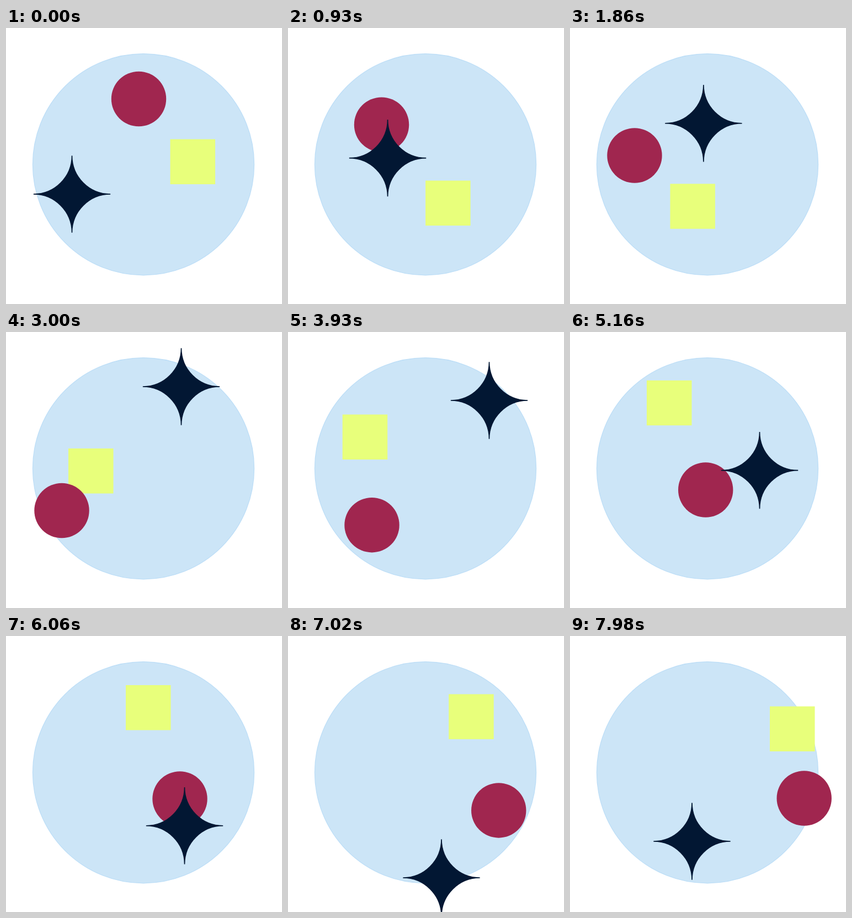
An HTML page that plays this animation: 500 px wide and 500 px high, repeating every 8 s.

```html
<!DOCTYPE html>
<html lang="en">
<head>
<meta charset="utf-8">
<title>Drifting shapes</title>
<style>
  html, body { margin: 0; width: 100%; height: 100%; overflow: hidden; background: #fff; }
  svg { display: block; width: 100vw; height: 100vh; }
</style>
</head>
<body>
<svg viewBox="0 0 500 500">
  <circle cx="249" cy="247.2" r="200.5" fill="#cce5f7" stroke="#bfdff7" stroke-width="1.4"/>
  <rect id="square" width="81.5" height="81.5" fill="#e8ff7b"/>
  <circle id="disc" r="49.7" fill="#a0264f"/>
  <path id="star" fill="#021733" stroke="#021733" stroke-width="1.6"
    d="M0-69.7A69.7 69.7 0 0 0 69.7 0A69.7 69.7 0 0 0 0 69.7A69.7 69.7 0 0 0-69.7 0A69.7 69.7 0 0 0 0-69.7Z"/>
</svg>
<script>
  const LOOP = 8000, STEP = 30;

  // Turning points of each drift: [ms, x, y]
  const drifts = {
    square: [[0, 297.5, 201.5], [810, 257, 270], [1620, 197.5, 291], [3000, 113, 211],
      [3930, 98.7, 149.5], [5160, 139, 87.7], [6060, 217, 89], [7980, 362, 127.5]],
    disc: [[0, 240.5, 128.5], [1860, 117, 231], [3000, 101, 323.5], [3540, 121, 362],
      [3930, 152, 349.7], [5160, 245.7, 286], [6060, 315, 295], [7290, 398, 318], [7980, 424.2, 294]],
    star: [[0, 119.5, 301], [3000, 317.5, 99], [3480, 351, 81.5], [3930, 364.5, 124],
      [6060, 323.5, 343.7], [6480, 308.5, 386.3], [7020, 278, 438], [7980, 221, 372]]
  };

  const slope = (a, b, axis) => (b[axis] - a[axis]) / (b[0] - a[0]);

  // Catmull-Rom velocity; the two ends continue the neighbouring curve.
  function velocity(points, i, axis) {
    const last = points.length - 1;
    if (i > 0 && i < last) return slope(points[i - 1], points[i + 1], axis);
    const next = i ? last - 1 : 1;
    return 2 * slope(points[i], points[next], axis) - velocity(points, next, axis);
  }

  function position(points, t) {
    const i = points.findLastIndex((p, k) => p[0] <= t && k < points.length - 1);
    const a = points[i], b = points[i + 1];
    const span = b[0] - a[0], u = (t - a[0]) / span, v = 1 - u;
    return [1, 2].map(axis =>
      v * v * (1 + 2 * u) * a[axis] + u * u * (3 - 2 * u) * b[axis] +
      span * u * v * (v * velocity(points, i, axis) - u * velocity(points, i + 1, axis)));
  }

  const start = performance.now();

  function draw() {
    const elapsed = (performance.now() - start) % LOOP;
    const t = Math.floor(elapsed / STEP) * STEP;
    for (const [id, points] of Object.entries(drifts)) {
      document.getElementById(id).setAttribute('transform', `translate(${position(points, t)})`);
    }
    requestAnimationFrame(draw);
  }
  draw();
</script>
</body>
</html>
```
